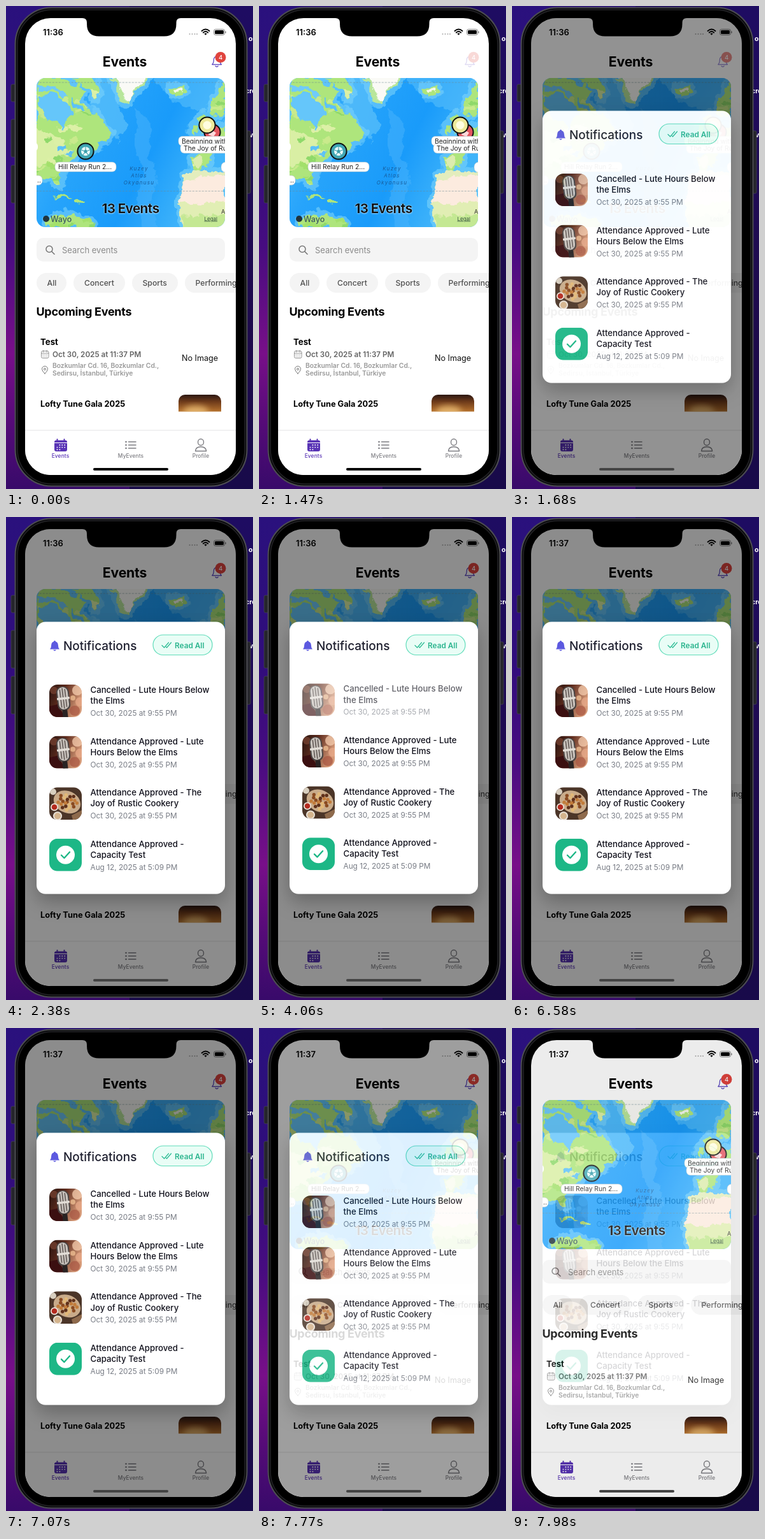
Recreate the animation shown at these times as an HTML page. Size 388 by 758 pixels, loop 8000 ms.

```html
<!DOCTYPE html>
<html lang="en">
<head>
<meta charset="utf-8">
<title>Event notifications</title>
<style>
  html, body { margin: 0; width: 100%; height: 100%; overflow: hidden; background: #1d0a5c; }
  svg { display: block; width: 388px; height: 758px; }
  text { font-family: Inter, "Liberation Sans", sans-serif; white-space: pre; }
</style>
</head>
<body>
<svg id="stage" viewBox="0 0 388 758" xmlns="http://www.w3.org/2000/svg"></svg>
<script>
const LOOP = 8000, STEP = 70;

// Markup helpers
const tag = (name, attrs, inner = '') =>
  `<${name} ${Object.entries(attrs).map(([k, v]) => `${k}="${v}"`).join(' ')}>${inner}</${name}>`;
const box = (x, y, width, height, rx, fill, more = {}) =>
  tag('rect', { x, y, width, height, rx, fill, ...more });
const dot = (cx, cy, r, fill, more = {}) => tag('circle', { cx, cy, r, fill, ...more });
const oval = (cx, cy, rx, ry, fill, more = {}) => tag('ellipse', { cx, cy, rx, ry, fill, ...more });
const shape = (d, fill, more = {}) => tag('path', { d, fill, ...more });
const line = (d, stroke, width = 1, more = {}) => tag('path', {
  d, stroke, fill: 'none', 'stroke-width': width,
  'stroke-linecap': 'round', 'stroke-linejoin': 'round', ...more });
const text = (x, y, str, size, weight, fill, more = {}) =>
  tag('text', { x, y, 'font-size': size, 'font-weight': weight, fill, ...more }, str);
const mid = { 'text-anchor': 'middle' };
const group = (attrs, ...parts) => tag('g', attrs, parts.join(''));
const gradient = (id, dir, ...stops) => tag('linearGradient', { id, ...dir },
  stops.map(([offset, color]) => tag('stop', { offset, 'stop-color': color })).join(''));
const clip = (id, inner) => tag('clipPath', { id }, inner);
const down = { x1: 0, y1: 0, x2: 0, y2: 1 };
const across = { x1: 0, y1: 0, x2: 1, y2: 0.4 };

const screen = (fill, more) => box(30, 19, 331, 717, 0, fill, more);

// Coast lines; the map's rough edges come from a turbulence filter
const america = 'M48 113H92L99 124L112 122L122 137L116 150L128 158L140 166L152 184L166 201L158 211L143 214L148 222L134 229L119 233L106 240L96 249L89 258L84 265L86 281L80 282L75 270L58 270L48 276Z';
const africa = 'M284 263L296 259L318 258L344 262V347H281L273 326L272 307L277 287Z';
const europe = 'M344 216L331 222L318 224L322 234L317 252L303 260L291 257L291 239L304 234L307 219L320 209L330 201L333 190L344 188Z';
const norway = 'M344 113V169L333 175L324 168L322 154L331 140L336 127Z';
const britain = 'M302 176L311 169L316 184L320 198L305 203L308 190ZM291 190L300 186L301 198L291 201Z';
const south = 'M61 347L69 334L84 327L105 329L123 334L142 347Z';
const baffin = 'M104 113H137L149 132L140 145L129 132L113 124Z';
const greenland = 'M164 113H224L219 124L205 131L195 145L190 157L181 148L176 133Z';
const iceland = 'M257 130L264 126L279 127L282 134L270 140L260 137Z';
const land = [america, europe, norway, britain, south, baffin, iceland].join('');

const defs = tag('defs', {}, [
  gradient('wallLeft', down, [0, '#2a117d'], [0.3, '#300d7c'], [0.5, '#470c80'], [0.72, '#780f89'], [0.86, '#560b78'], [1, '#380a6a']),
  gradient('wallRight', down, [0, '#1e0c62'], [0.35, '#1f0b55'], [0.7, '#1d0a4b'], [1, '#180a4a']),
  gradient('sea', across, [0, '#4bbbfb'], [0.35, '#27a4fb'], [0.7, '#199bfa'], [1, '#40b4fa']),
  gradient('stagePhoto', down, [0, '#2c1712'], [0.18, '#6d3a1a'], [0.45, '#b8742f'], [1, '#7a4118']),
  gradient('micPhoto', across, [0, '#24130f'], [0.45, '#5d2a1c'], [1, '#d69a78']),
  clip('screenClip', box(30, 19, 331, 717, 40)),
  clip('mapClip', box(48, 113, 296, 234, 14)),
  clip('landClip', shape(land, '#000')),
  clip('listClip', box(30, 495, 331, 141.5, 0)),
  clip('thumbClip', box(0, 0, 51, 51, 13)),
  tag('filter', { id: 'rough', x: 40, y: 105, width: 312, height: 250, filterUnits: 'userSpaceOnUse', 'color-interpolation-filters': 'sRGB' },
    tag('feTurbulence', { type: 'fractalNoise', baseFrequency: 0.07, numOctaves: 3, seed: 4, result: 'noise' }) +
    tag('feDisplacementMap', { in: 'SourceGraphic', in2: 'noise', scale: 16, xChannelSelector: 'R', yChannelSelector: 'G' })),
  tag('filter', { id: 'soft', x: '-30%', y: '-30%', width: '160%', height: '160%' }, tag('feGaussianBlur', { stdDeviation: 5 })),
  tag('filter', { id: 'shadow', x: '-30%', y: '-30%', width: '160%', height: '160%' },
    tag('feDropShadow', { dx: 0, dy: 12, stdDeviation: 15, 'flood-opacity': 0.27 })),
  tag('filter', { id: 'glow', x: '-20%', y: '-40%', width: '140%', height: '190%' },
    tag('feDropShadow', { dx: 0, dy: 0.5, stdDeviation: 1.3, 'flood-color': '#fff', 'flood-opacity': 0.75 }))
].join(''));

function wall() {
  return box(0, 0, 200, 758, 0, 'url(#wallLeft)') + box(194, 0, 194, 758, 0, 'url(#wallRight)') +
    [[381, 55, 'o'], [376, 137, 'cre'], [382, 206, 'v']]
      .map(([x, y, s]) => text(x, y, s, 10.5, 700, '#fff')).join('');
}

function phone() {
  const buttons = [[8, 123, 27], [8, 178, 59], [8, 250, 59], [376, 196, 98]]
    .map(([x, y, h]) => box(x, y, 8, h, 2, '#25252b', { stroke: '#45454d', 'stroke-width': 0.8 }));
  return buttons.join('') +
    box(14.5, 2.5, 364, 751, 57, '#0b0b0d', { stroke: '#4d4d53', 'stroke-width': 2 }) +
    box(18, 6, 357, 744, 54, '#000', { stroke: '#232326', 'stroke-width': 1.5 });
}

function statusBar() {
  const dots = [288.5, 292.5, 296.5, 300].map(x => dot(x, 44, 1, '#aaa')).join('');
  const wifi = line('M307.5 39.2Q313.5 33.6 319.5 39.2M309.8 41.7Q313.5 38.3 317.2 41.7', '#000', 1.9) +
    shape('M311.4 43.5Q313.5 41.7 315.6 43.5L313.5 45.7Z', '#000');
  const battery = box(326.5, 36.5, 17, 9, 2.8, 'none', { stroke: '#777', 'stroke-width': 0.9 }) +
    box(328, 38, 14, 6, 1.5, '#000') + box(344.4, 39.5, 1.2, 3.2, 0.6, '#777');
  return text(58, 45.6, '11:36', 13, 600, '#000', { id: 'clock' }) + dots + wifi + battery;
}

function header() {
  const bell = line('M323.8 91.8Q326.3 89.5 326.3 84.5Q326.6 79.5 331 79.2Q335.6 79.5 335.8 84.5Q335.8 89.5 338.4 91.8ZM329 94.2Q331 96.8 333.2 94.2', '#5039bd', 1.2);
  return text(186.5, 95, 'Events', 21.2, 700, '#000', { ...mid, 'letter-spacing': -0.2 }) +
    group({ id: 'bell' }, bell, dot(337, 80.5, 8.5, '#e0443e'), text(337, 84, '4', 9.5, 500, '#fff', mid));
}

function pin(x, y, fill) {
  return dot(x, y, 12.6, fill, { stroke: '#101010', 'stroke-width': 2 });
}

// Patches of forest and plain scattered over the land
function patches() {
  let seed = 7;
  const rand = () => (seed = seed * 16807 % 2147483647) / 2147483647;
  const tones = ['#c9ea8c', '#8fd96a', '#dcf0a6', '#a3e06b'];
  const list = Array.from({ length: 70 }, (_, i) => {
    const left = i % 4 > 0;
    const x = left ? 48 + rand() * 112 : 290 + rand() * 54;
    const y = 113 + rand() * (left ? 234 : 145);
    return oval(x.toFixed(1), y.toFixed(1), (4 + rand() * 9).toFixed(1), (2 + rand() * 4).toFixed(1), tones[Math.floor(rand() * 4)]);
  });
  return group({ 'clip-path': 'url(#landClip)' }, ...list);
}

function terrain() {
  const shoal = '#7bd2fb', grass = '#aee57c', sand = '#fcebdf';
  const coast = land + africa;
  return group({ filter: 'url(#rough)' },
    shape('M206 160L230 190L222 230L238 270L226 310L239 355H214L205 300L215 262L203 215Z', '#4ab4fb', { opacity: 0.5 }),
    shape('M145 105H190L178 165L192 185L178 212L155 195L132 150Z', '#66c7fb', { opacity: 0.6 }),
    shape('M228 105H335V168L296 163L262 151Z', '#58bffb', { opacity: 0.6 }),
    line(coast + greenland, shoal, 13, { opacity: 0.6 }),
    shape(coast, grass),
    shape('M40 188L72 200L91 219L79 247L40 253Z', '#d9efa4'),
    patches(),
    shape('M51 146L68 136L88 148L101 158L104 171L94 181L91 195L83 184L66 176L57 163Z', '#65c6fa'),
    shape('M48 126L66 122L82 131L97 141L90 145L73 132L52 135Z', '#70cbfa'),
    shape('M103 143L113 153L125 163L118 169L108 159ZM81 222L91 218L96 224L87 227ZM91 231L104 228L101 234Z', '#5cc1f9'),
    shape('M75 298Q91 292 106 304L94 302ZM110 306L122 306L121 311L111 310Z', grass),
    shape(greenland, '#b8e69b'),
    shape('M169 108H221L216 121L202 129L192 150L183 139L179 127Z', '#fafaf6'),
    shape('M265 130L274 129L275 134L267 135Z', '#f5f8ec'),
    shape(africa, sand),
    shape('M284 263L296 259L318 258L352 262V268L318 266L298 270L280 276Z', '#e3edbd'),
    shape('M272 309L300 311L352 306V355H281L273 326Z', '#e1eeb4'),
    shape('M276 328L305 330L352 324V355H281Z', '#c4e893'),
    shape('M292 240L310 238L314 249L302 257Z', '#dcecae'));
}

function worldMap() {
  const label = (x, y, w, s, tx) => box(x, y, w, 15, 6, '#fff', { stroke: '#bcc7cc', 'stroke-width': 0.6 }) +
    text(tx, y + 11.2, s, 10.3, 400, '#222');
  const ball = group({ transform: 'translate(125 228)' },
    dot(0, 0, 7, '#e9fbfb'),
    shape('M0 -3L3 -.8L1.8 2.7H-1.8L-3 -.8Z', '#3b9fae'),
    line('M0 -3V-6.5M3 -.8L6.2 -2M1.8 2.7L4 5.5M-1.8 2.7L-4 5.5M-3 -.8L-6.2 -2', '#3b9fae', 1.1));
  return group({ 'clip-path': 'url(#mapClip)' },
    box(48, 113, 296, 234, 0, 'url(#sea)'),
    terrain(),
    line('M48 120H344M48 290.5H344', '#6b8791', 0.8, { 'stroke-dasharray': '2.5 2.5', opacity: 0.65 }),
    ['Kuzey', 'Atlas', 'Okyanusu'].map((s, i) =>
      text(209, 258 + i * 11, s, 8, 400, '#185c9b', { ...mid, 'font-style': 'italic', 'letter-spacing': 1.3 })).join(''),
    pin(324, 198, '#e35660'),
    shape('M321 193L330 199L326 205L318 202Z', '#ffdadc'),
    label(271, 204.5, 90, 'Beginning with', 276),
    label(274, 216, 90, 'The Joy of Ru', 279),
    pin(316, 187, '#eee99a'),
    dot(316, 187, 6.5, '#fffde0'),
    pin(125, 228, '#3fa6b4'), ball,
    label(77, 245, 96, 'Hill Relay Run 2...', 82),
    label(30, 266, 27, '...', 46),
    box(38, 214, 12, 14, 6, '#fff'),
    box(338, 245, 20, 16, 7, '#fff', { stroke: '#bcc7cc', 'stroke-width': 0.6 }),
    text(338, 326, 'A', 9, 400, '#333'),
    dot(63, 334, 5, '#20333c'),
    text(70, 338.5, 'Wayo', 12.5, 500, '#3c5960'),
    text(311.5, 336.5, 'Legal', 8, 400, '#36543f', { 'text-decoration': 'underline' }),
    text(195.5, 325, '13 Events', 20.5, 700, '#080808', { ...mid, 'letter-spacing': -0.55, filter: 'url(#glow)' }));
}

function filters() {
  const chips = [['All', 48, 47, 64.5], ['Concert', 106, 81, 123], ['Sports', 198, 72, 214.5], ['Performing', 281, 110, 297.5]];
  return box(48, 364, 296, 37, 10, '#f4f4f4') +
    dot(68, 381.5, 5, 'none', { stroke: '#777', 'stroke-width': 1.5 }) + line('M72 385.5L76 389.5', '#777', 1.6) +
    text(88, 388, 'Search events', 13, 400, '#8b8b8b') +
    chips.map(([s, x, w, tx]) => box(x, 419, w, 31, 15.5, '#f4f4f4') +
      text(tx, 439.3, s, 12.2, 500, '#505050')).join('');
}

function eventList() {
  const calendar = box(55.5, 541.5, 11.5, 11, 2, 'none', { stroke: '#929292' }) +
    line('M56 545H67M58.5 540.5V543M64 540.5V543', '#929292') +
    line('M58 547.5H65M58 550H65', '#929292', 1.2, { 'stroke-dasharray': '.5 2.4' });
  const place = line('M61 577Q56.5 572.5 56.5 569.7A4.5 4.5 0 0 1 65.5 569.7Q65.5 572.5 61 577Z', '#777') +
    dot(61, 569.8, 1.5, 'none', { stroke: '#777' });
  const thumb = box(271, 610, 67, 60, 10, 'url(#stagePhoto)') +
    oval(298, 636, 20, 9, '#f0c47c', { opacity: 0.75, filter: 'url(#soft)' });
  return text(47.5, 486, 'Upcoming Events', 18, 700, '#000', { 'letter-spacing': -0.3 }) +
    group({ 'clip-path': 'url(#listClip)' },
      text(54, 532, 'Test', 13.2, 700, '#000'), calendar,
      text(73, 551, 'Oct 30, 2025 at 11:37 PM', 11.7, 600, '#646464'), place,
      text(73, 567.5, 'Bozkumlar Cd. 16, Bozkumlar Cd.,', 10.3, 600, '#999'),
      text(73, 580, 'Sedirsu, İstanbul, Türkiye', 10.3, 600, '#999'),
      text(304.5, 556.5, 'No Image', 12.6, 400, '#111', mid),
      text(54, 629, 'Lofty Tune Gala 2025', 12.8, 700, '#000'), thumb);
}

function tabBar() {
  const purple = '#5934b5', grey = '#7d7d82';
  const days = Array.from({ length: 9 }, (_, i) => i + 1)
    .map(i => dot(80.5 + i % 4 * 3.9, 689 + Math.floor(i / 4) * 3.6, 0.95, '#fff')).join('');
  const calendar = box(76, 681.5, 20, 17.5, 3, purple) + line('M80.5 680V683M91.5 680V683', purple, 2) +
    box(76, 685, 20, 1, 0, '#fff') + days;
  const rows = [684, 689, 694].map(y => dot(188.5, y, 1.3, grey) + line(`M192.5 ${y}H204`, grey, 1.5)).join('');
  const person = oval(306, 684.5, 4.5, 5, 'none', { stroke: grey, 'stroke-width': 1.4 }) +
    line('M297.5 698.5Q298 691.8 306 691.8Q314 691.8 314.7 698.5Z', grey, 1.4);
  return box(30, 665.5, 331, 71, 0, '#fff') + box(30, 665.5, 331, 0.8, 0, '#dcdcde') + calendar + rows + person +
    [['Events', 85.5, purple], ['MyEvents', 196, grey], ['Profile', 306, grey]]
      .map(([s, x, c]) => text(x, 709, s, 8.4, 500, c, { ...mid, 'letter-spacing': 0.1 })).join('');
}

// Thumbnails, each drawn in a 51 px square
const thumbs = {
  mic: () => box(0, 0, 51, 51, 0, 'url(#micPhoto)') +
    [[44, 9, 8, '#f6cdae'], [48, 27, 7, '#e7a988'], [37, 21, 4, '#f2c295'], [40, 41, 8, '#a85743'], [7, 9, 6, '#76412f']]
      .map(([x, y, r, c]) => dot(x, y, r, c, { opacity: 0.75 })).join('') +
    shape('M0 34L13 31L25 51H0Z', '#3b0f10') +
    group({ transform: 'rotate(-7 22 22)' },
      box(12, 3, 20, 38, 9, '#4b4543'), box(14, 4, 16, 35, 8, '#c9c3bd'),
      line('M18 8V35M22 6V37M26 8V35', '#625955', 1.6),
      box(12, 20, 20, 3.5, 1, '#e2ddd6'), box(18, 40, 8, 13, 1, '#292323')),
  food: () => box(0, 0, 51, 51, 0, '#4b3528') +
    oval(28, 23, 22, 17, '#c9ab8a', { transform: 'rotate(25 28 23)' }) +
    Array.from({ length: 22 }, (_, i) => {
      const a = i * 2.4, r = 3.4 * Math.sqrt(i);
      return dot((28 + r * Math.cos(a)).toFixed(1), (23 + r * Math.sin(a) * 0.85).toFixed(1), 2.7,
        ['#8a4a20', '#c27c3a', '#5f301a', '#e2b878'][i % 4]);
    }).join('') +
    dot(8, 31, 6, '#efe6dc') + dot(8, 31, 4.3, '#b42a1e') +
    dot(13, 45, 7, '#e9e1d6') + dot(13, 45, 5, '#d4b48d') + dot(6, 7, 5, '#d8cfc0') +
    shape('M35 44L51 36V51H37Z', '#8e6a4c'),
  check: () => box(0, 0, 51, 51, 0, '#1db786') + dot(25.5, 25.5, 14.5, '#fff') +
    line('M19 26L23.5 30.5L32 21', '#1db786', 2.3)
};

const notes = [
  ['mic', 'Cancelled - Lute Hours Below', 'the Elms', 'Oct 30, 2025 at 9:55 PM'],
  ['mic', 'Attendance Approved - Lute', 'Hours Below the Elms', 'Oct 30, 2025 at 9:55 PM'],
  ['food', 'Attendance Approved - The', 'Joy of Rustic Cookery', 'Oct 30, 2025 at 9:55 PM'],
  ['check', 'Attendance Approved -', 'Capacity Test', 'Aug 12, 2025 at 5:09 PM']
];

function modal() {
  const rows = notes.map(([kind, first, second, date], i) =>
    group({ transform: `translate(68 ${263 + i * 80.6})`, id: `note${i}` },
      group({ 'clip-path': 'url(#thumbClip)' }, thumbs[kind]()),
      text(64.5, 13, first, 13.2, 500, '#11111c'),
      text(64.5, 30.3, second, 13.2, 500, '#11111c'),
      text(64.5, 49, date, 11.8, 400, '#777b84')));
  const bell = shape('M69 207.5Q71.2 205 71.2 200.5Q71.5 196.3 75 195.4A1.5 1.5 0 0 1 78 195.4Q81.5 196.3 81.8 200.5Q81.8 205 84 207.5ZM74 208.5H79Q76.5 211.8 74 208.5Z', '#5c59e0');
  const ticks = line('M245 201.5L248.5 205L255.5 197M251.5 204L252.5 205L259.5 197', '#2fbd95', 1.3);
  return group({ id: 'modal', opacity: 0 },
    screen('#000', { 'fill-opacity': 0.45 }),
    box(48, 164.5, 296, 427, 14, '#fff', { filter: 'url(#shadow)' }),
    bell, text(90, 208.5, 'Notifications', 19, 500, '#1f2030'),
    box(231, 185, 93, 31.5, 15.7, '#e9fdf6', { stroke: '#5fdcb9', 'stroke-width': 1.2 }),
    ticks, text(265, 205.5, 'Read All', 11.8, 600, '#2bb58e'),
    group({ id: 'list' }, ...rows));
}

const notch = shape('M120 18V19Q127 19 127 26V28Q127 47.5 146 47.5H248.5Q267.5 47.5 267.5 28V26Q267.5 19 274.5 19V18Z', '#000');
const homeBar = box(137, 725, 118, 4, 2, '#000', { id: 'homeBar' });

document.getElementById('stage').innerHTML = defs + wall() + phone() +
  group({ 'clip-path': 'url(#screenClip)' },
    screen('#fff'),
    statusBar(), header(), worldMap(), filters(), eventList(), tabBar(), modal(), homeBar, notch);

// Motion: keys are [time, value], linear in between
const fadeKeys = [[1540, 0], [1610, 0.45], [1680, 0.95], [1890, 0.95], [1960, 1], [7700, 1], [7770, 0.85], [7840, 0.62], [7910, 0.38], [7980, 0.17]];
const bellKeys = [[1330, 1], [1400, 0.5], [1470, 0.2], [1540, 0.2], [1820, 1]];
const pressKeys = [[3640, 1], [3710, 0.7], [3780, 0.4], [3920, 0.4], [4060, 0.65], [4200, 1]];
const drags = [
  { start: 3850, end: 4340, release: 4410, peak: 9 },
  { start: 6510, end: 6930, release: 7000, peak: 13.4 }
];

function track(keys, t) {
  const next = keys.findIndex(([time]) => time > t);
  if (next === 0) return keys[0][1];
  if (next < 0) return keys[keys.length - 1][1];
  const [t0, a] = keys[next - 1], [t1, b] = keys[next];
  return a + (b - a) * (t - t0) / (t1 - t0);
}

// Pull past the end, then a critically damped return
function overscroll(t) {
  const drag = drags.filter(d => t >= d.start).pop();
  if (!drag) return 0;
  const pull = Math.min(1, (t - drag.start) / (drag.end - drag.start));
  const x = Math.max(0, t - drag.release) * 0.011;
  const shift = drag.peak * pull * pull * (1 + x) * Math.exp(-x);
  return shift < 0.4 ? 0 : shift;
}

const [clock, bell, sheet, list, pressed, home] =
  ['clock', 'bell', 'modal', 'list', 'note0', 'homeBar'].map(id => document.getElementById(id));

function draw(now) {
  const t = Math.floor((now % LOOP) / STEP) * STEP;
  clock.textContent = t < 5600 ? '11:36' : '11:37';
  bell.setAttribute('opacity', track(bellKeys, t));
  sheet.setAttribute('opacity', track(fadeKeys, t));
  pressed.setAttribute('opacity', track(pressKeys, t));
  list.setAttribute('transform', `translate(0 ${-overscroll(t).toFixed(2)})`);
  home.setAttribute('fill', t < 1680 ? '#000' : '#444');
}

const began = performance.now();
function tick() {
  draw(performance.now() - began);
  requestAnimationFrame(tick);
}
tick();
</script>
</body>
</html>
```
